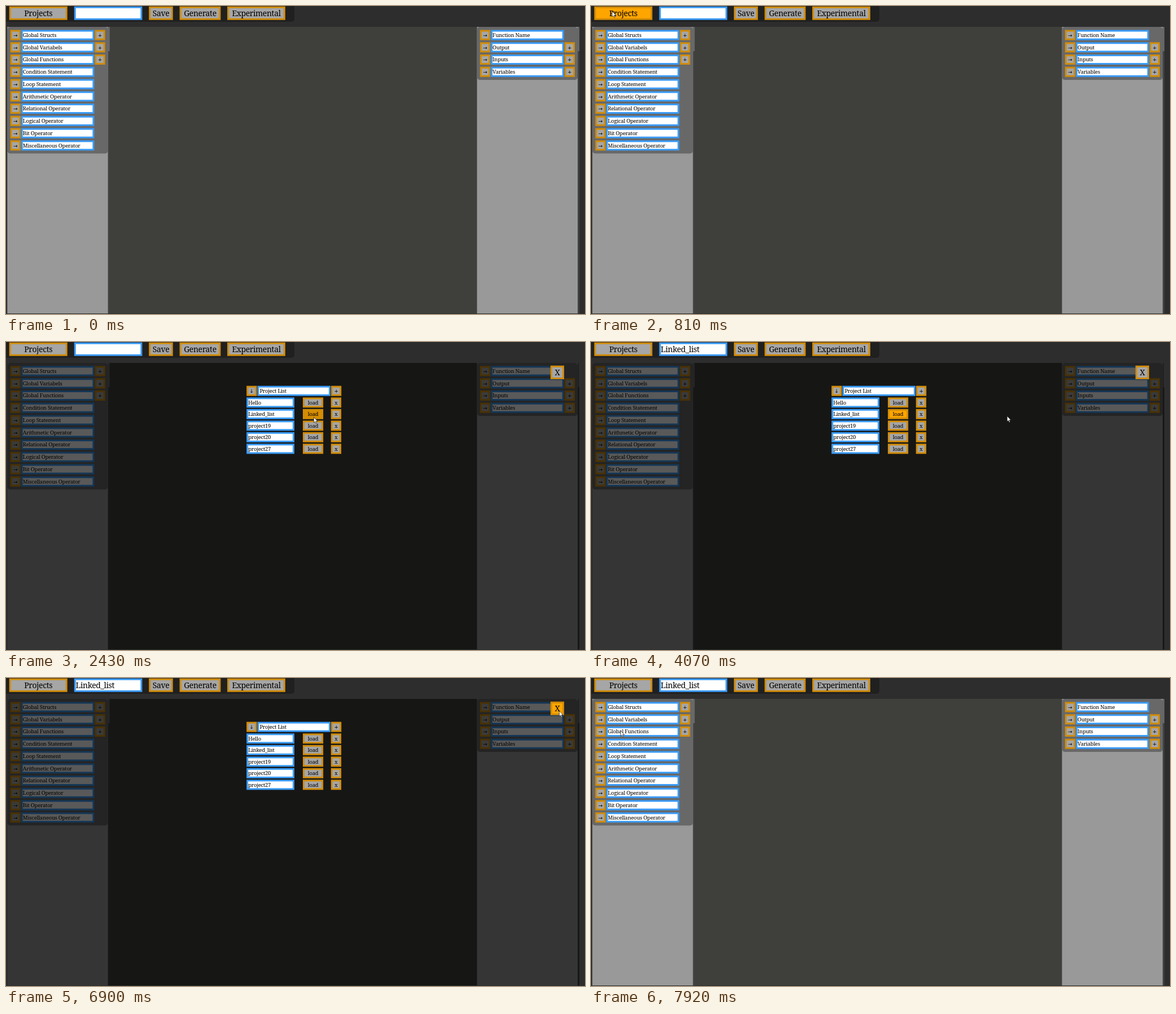
An HTML page that plays this animation: 1026 by 546 pixels, repeating every 8000 ms.

```html
<!DOCTYPE html>
<html lang="en">
<head>
<meta charset="utf-8">
<title>Visual code editor</title>
<style>
  html, body { margin: 0; width: 100%; height: 100%; overflow: hidden; background: #2d2d2d; }
  svg { display: block; width: 100%; height: 100%; }
  text { font: 9.5px "Noto Serif", serif; letter-spacing: -.028em; fill: #000; white-space: pre; }
  text.big { font-size: 14px; }
  text.icon { font-family: "DejaVu Sans", sans-serif; font-size: 9px; letter-spacing: 0; }
  .button rect { fill: #a6a6a6; stroke: #d18c08; stroke-width: 3; }
  .button.hover rect { fill: #ffa500; }
  .button.pressed rect { fill: #d68d00; }
  .field rect { fill: #fff; stroke: #3a9bf7; stroke-width: 3; }
</style>
</head>
<body>
<svg id="stage" viewBox="0 0 1026 546"></svg>
<script>
const stage = document.getElementById('stage');
const LOOP = 8000;

function add(parent, tag, attrs, content) {
  const node = document.createElementNS('http://www.w3.org/2000/svg', tag);
  for (const key in attrs) node.setAttribute(key, attrs[key]);
  if (content) node.textContent = content;
  return parent.appendChild(node);
}

const group = parent => add(parent, 'g', {});

function block(parent, x, y, width, height, fill, rx = 0) {
  return add(parent, 'rect', { x, y, width, height, fill, rx });
}

// A bordered box whose 3px border lies inside the given bounds.
function box(parent, kind, x, y, width, height) {
  const g = add(parent, 'g', { class: kind });
  add(g, 'rect', { x: x + 1.5, y: y + 1.5, width: width - 3, height: height - 3 });
  return g;
}

function button(parent, x, y, width, height, label, style = '') {
  const g = box(parent, 'button', x, y, width, height);
  const drop = style === 'big' ? 4.8 : 3.3;
  add(g, 'text', { x: x + width / 2, y: y + height / 2 + drop, 'text-anchor': 'middle', class: style }, label);
  return g;
}

function field(parent, x, y, width, label, inset = 3) {
  const g = box(parent, 'field', x, y, width, 18);
  add(g, 'text', { x: x + inset, y: y + 12.3 }, label);
}

function row(parent, x, y, label, hasPlus, arrow = '→', inset = 3) {
  button(parent, x, y, 18.3, 18, arrow, 'icon');
  field(parent, x + 19.2, y, 129.6, label, inset);
  if (hasPlus) button(parent, x + 149.8, y, 18.3, 18, '+', 'icon');
}

// Toolbar
block(stage, 0, 0, 1026, 546, '#2d2d2d');
block(stage, -6, -6, 517, 34, '#202020', 5);
const projects = button(stage, 5.7, .8, 103, 24, 'Projects', 'big');
const nameField = box(stage, 'field', 120.8, .8, 120.6, 24);
const projectName = add(nameField, 'text', { x: 123.6, y: 17.6, class: 'big' }, 'Linked_list');
button(stage, 253.2, .8, 42.6, 24, 'Save', 'big');
button(stage, 307.6, .8, 72.8, 24, 'Generate', 'big');
button(stage, 392.1, .8, 102.8, 24, 'Experimental', 'big');

// Workspace
const work = group(stage);
block(work, 2, 37, 1014, 508, '#3f403b');

function sidebar(x, rows, panelHeight) {
  block(work, x, 37, 178.5, 508, '#999');
  block(work, x + 178.5, 37, 3, 508, '#424242');
  block(work, x + 178.5, 37, 3, 43, '#686868');
  block(work, x, 37, 178.5, panelHeight, '#686868', 5);
  rows.forEach(([label, hasPlus], i) => row(work, x + 5.3, 42.5 + 21.75 * i, label, hasPlus));
}

sidebar(2.3, [
  ['Global Structs', true], ['Global Variabels', true], ['Global Functions', true],
  ['Condition Statement'], ['Loop Statement'], ['Arithmetic Operator'],
  ['Relational Operator'], ['Logical Operator'], ['Bit Operator'], ['Miscellaneous Operator']
], 224.5);
sidebar(834.6, [
  ['Function Name'], ['Output', true], ['Inputs', true], ['Variables', true]
], 94);

// Project dialog
const dialog = group(stage);
block(dialog, 2, 37, 1014, 508, 'rgba(0,0,0,.65)');
row(dialog, 426.2, 77.7, 'Project List', true, '↓', 4);
const loads = ['Hello', 'Linked_list', 'project19', 'project20', 'project27'].map((name, i) => {
  const y = 98.3 + 20.5 * i;
  field(dialog, 426.2, y, 84.8, name);
  button(dialog, 575.8, y, 18.3, 18, 'x');
  return button(dialog, 526, y, 36.2, 18, 'load');
});
const closeButton = button(dialog, 964.8, 41.8, 24.2, 24.2, 'X', 'big');

const cursor = add(stage, 'path', {
  d: 'M.4 .4V10L2.6 8 4.2 11.6 5.7 11 4.2 7.5H7.2Z',
  fill: '#fff', stroke: '#222', 'stroke-width': .7
});

// Pointer stops: time, x, y
const stops = [
  [200, 794, 493], [390, 79, 228], [590, 32, 48], [810, 37, 9],
  [1410, 73, 21], [1610, 341, 124], [1810, 506, 145], [2030, 542, 135],
  [2230, 544, 137], [2430, 545, 133], [3650, 589, 133], [3850, 710, 132],
  [4070, 737, 131], [6700, 948, 84], [6900, 980, 58], [7320, 917, 62],
  [7520, 258, 105], [7720, 105, 97], [7920, 52, 93]
];

function show(node, visible) {
  node.setAttribute('visibility', visible ? 'visible' : 'hidden');
}

function draw() {
  const t = performance.now() % LOOP;
  const during = (from, to) => t >= from && t < to;

  projects.classList.toggle('hover', during(810, 1610));
  loads[1].classList.toggle('hover', during(2030, 6300));
  loads[1].classList.toggle('pressed', during(2430, 2630));
  closeButton.classList.toggle('hover', during(6900, 7100));
  show(dialog, during(1010, 7100));
  show(projectName, t >= 2630);

  const stop = stops.filter(s => s[0] <= t).pop();
  show(cursor, !!stop);
  if (stop) cursor.setAttribute('transform', `translate(${stop[1]} ${stop[2]})`);
  requestAnimationFrame(draw);
}
draw();
</script>
</body>
</html>
```
